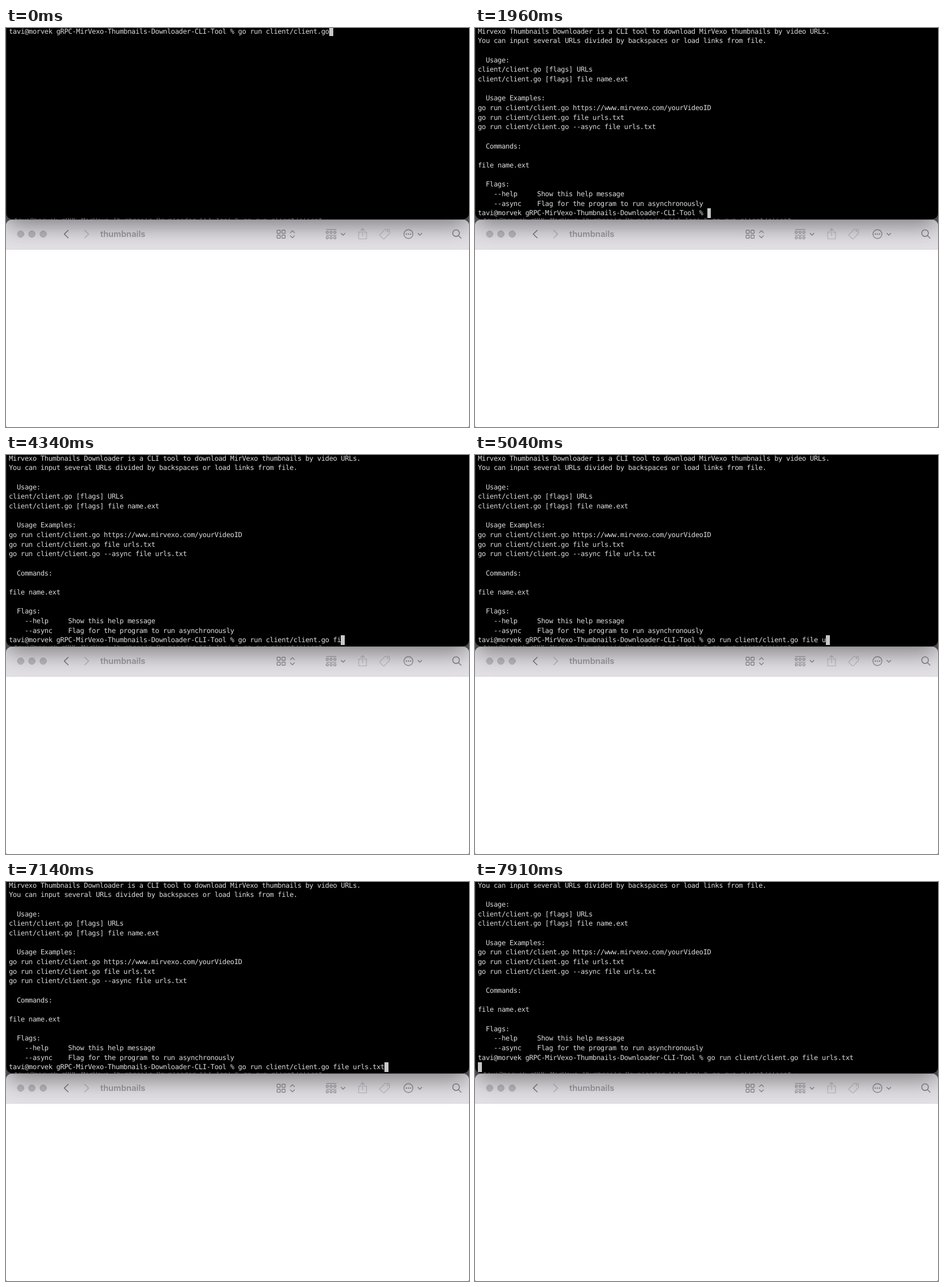
These frames come from a looping animation (805 px wide and 695 px high, 8 s). An HTML page:

```html
<!DOCTYPE html>
<html lang="en">
<head>
<meta charset="utf-8">
<title>Thumbnail downloader</title>
<style>
  html, body { margin: 0; width: 100%; height: 100%; overflow: hidden; background: #5c5b5e; }
  #stage { position: relative; width: 805px; height: 695px; overflow: hidden; }
  #stage > * { position: absolute; }
  #finder {
    left: 0; top: 334px; width: 805px; height: 361px; overflow: hidden;
    background: #fff; border-radius: 10px 10px 2px 2px;
  }
  #finder svg { display: block; background: #e4e1e6; }
  #finder text { font: 600 14.6px Inter, "Liberation Sans", sans-serif; fill: #9d9a9f; }
  #terminal {
    left: 0; top: -40px; width: 805px; height: 373px; box-sizing: border-box;
    background: #000; border-left: 1px solid #262626; border-radius: 0 0 10px 10px;
    box-shadow: 0 12px 40px rgba(0, 0, 0, .45);
  }
  .mono {
    margin: 0; white-space: pre; color: #dcdcdc;
    font: 12px/16.67px "DejaVu Sans Mono", "Liberation Mono", monospace;
    letter-spacing: -.352px; text-rendering: geometricPrecision; font-variant-ligatures: none;
  }
  #screen { left: 5px; top: -2.5px; }
  #cursor { left: 0; top: 0; background: #c8c8c8; }
  #behind {
    left: 14px; top: 331px; width: 545px; height: 3px; overflow: hidden;
    line-height: 8px; color: #6f6f6f;
  }
</style>
</head>
<body>
<div id="stage">
  <div id="finder">
    <svg width="805" height="52" viewBox="0 334 805 52" fill="none" stroke="#918e93"
         stroke-width="1.4" stroke-linecap="round" stroke-linejoin="round">
      <path d="M0 385.5H805" stroke="#d6d3d8" stroke-width="1"/>
      <g fill="#bebbc0" stroke="#b2afb4" stroke-width="1">
        <circle cx="25.5" cy="359" r="5.7"/>
        <circle cx="45" cy="359" r="5.7"/>
        <circle cx="64.7" cy="359" r="5.7"/>
      </g>
      <path d="M108 352.5L101.3 359L108 365.5" stroke="#7d7a80" stroke-width="1.7"/>
      <path d="M137 352.5L143.7 359L137 365.5" stroke="#bbb8bd" stroke-width="1.7"/>
      <text x="164" y="364" stroke="none">thumbnails</text>

      <g id="tiles"></g>
      <path d="M494.5 356.5L498 353L501.5 356.5M494.5 362L498 365.5L501.5 362"/>
      <path d="M557 351H574M557 361H574" stroke-width="1.2"/>
      <g id="groups" stroke-width="1.2"></g>
      <path d="M582.8 357.7L586 361L589.2 357.7M716.3 357.7L719.5 361L722.7 357.7" stroke-width="1.6"/>

      <g stroke="#c0bdc2" stroke-width="1.3">
        <path d="M617 355.5H613.2V367.3H626.8V355.5H623M620 362V349.5M616.8 352.5L620 349.3L623.2 352.5"/>
        <path d="M650.3 359.8L658.5 351.4Q659.3 350.6 660.5 350.6H665Q666.8 350.6 666.8 352.4V356.8Q666.8 358 666 358.8L657.8 367Q656.8 367.9 655.8 367L650.3 361.8Q649.4 360.8 650.3 359.8Z"/>
        <circle cx="663.3" cy="354" r=".8"/>
      </g>

      <circle cx="699.7" cy="359" r="7.8"/>
      <g fill="#918e93" stroke="none">
        <circle cx="696" cy="359" r="1.2"/>
        <circle cx="699.7" cy="359" r="1.2"/>
        <circle cx="703.4" cy="359" r="1.2"/>
      </g>
      <g stroke="#8a878c" stroke-width="1.6">
        <circle cx="782.5" cy="357.3" r="5.8"/>
        <path d="M786.8 361.7L791.2 366.2"/>
      </g>
    </svg>
  </div>
  <div id="terminal"></div>
  <div id="behind" class="mono"></div>
  <pre id="screen" class="mono"></pre>
  <div id="cursor"></div>
</div>

<script>
const LOOP = 8000, CHAR_W = 6.872, LINE_H = 16.67, LEFT = 5, TOP = -2.85;
const PROMPT = "tavi@morvek gRPC-MirVexo-Thumbnails-Downloader-CLI-Tool % ";
const RUN = "go run client/client.go";
const COMMAND = RUN + " file urls.txt";
const HELP = `Mirvexo Thumbnails Downloader is a CLI tool to download MirVexo thumbnails by video URLs.
You can input several URLs divided by backspaces or load links from file.

  Usage:
client/client.go [flags] URLs
client/client.go [flags] file name.ext

  Usage Examples:
go run client/client.go https://www.mirvexo.com/yourVideoID
go run client/client.go file urls.txt
go run client/client.go --async file urls.txt

  Commands:

file name.ext

  Flags:
    --help     Show this help message
    --async    Flag for the program to run asynchronously`.split("\n");

const ENTER = 770, HELP_AT = 1960, RECALL = 2870, SUBMIT = 7630;
// One time per key typed after the recalled command
const KEYS = [3780, 3990, 4200, 4480, 4550, 4690, 4900, 5110, 5320, 5530, 5670, 6580, 6860, 7140];

const $ = id => document.getElementById(id);
const screenEl = $("screen"), cursorEl = $("cursor");

function linesAt(t) {
  if (t < ENTER) return [PROMPT + RUN];
  if (t < HELP_AT) return [PROMPT + RUN, ""];
  if (t >= SUBMIT) return [...HELP.slice(1), PROMPT + COMMAND, ""];
  const typed = t < RECALL ? 0 : RUN.length + KEYS.filter(k => k <= t).length;
  return [...HELP, PROMPT + COMMAND.slice(0, typed)];
}

// The cursor fills one cell, with its edges on whole pixels
function placeCursor(col, row) {
  const xAt = c => Math.round(LEFT + c * CHAR_W);
  const yAt = r => Math.round(TOP + r * LINE_H);
  Object.assign(cursorEl.style, {
    left: xAt(col) + "px",
    top: yAt(row) + "px",
    width: xAt(col + 1) - xAt(col) + "px",
    height: yAt(row + 1) - yAt(row) + "px"
  });
}

let shown = null;
function render() {
  const lines = linesAt(performance.now() % LOOP);
  const text = lines.join("\n");
  if (text !== shown) {
    shown = text;
    screenEl.textContent = text;
    placeCursor(lines.at(-1).length, lines.length - 1);
  }
  requestAnimationFrame(render);
}

function addSquares(id, xs, ys, size) {
  for (const y of ys) for (const x of xs) {
    const rect = document.createElementNS("http://www.w3.org/2000/svg", "rect");
    const attrs = { x, y, width: size, height: size, rx: 1 };
    for (const name in attrs) rect.setAttribute(name, attrs[name]);
    $(id).append(rect);
  }
}

addSquares("tiles", [471.3, 479.8], [352.2, 360.7], 5.6);
addSquares("groups", [556.8, 563.4, 570], [354, 363.5], 3.6);
$("behind").textContent = PROMPT + RUN;
render();
</script>
</body>
</html>
```
